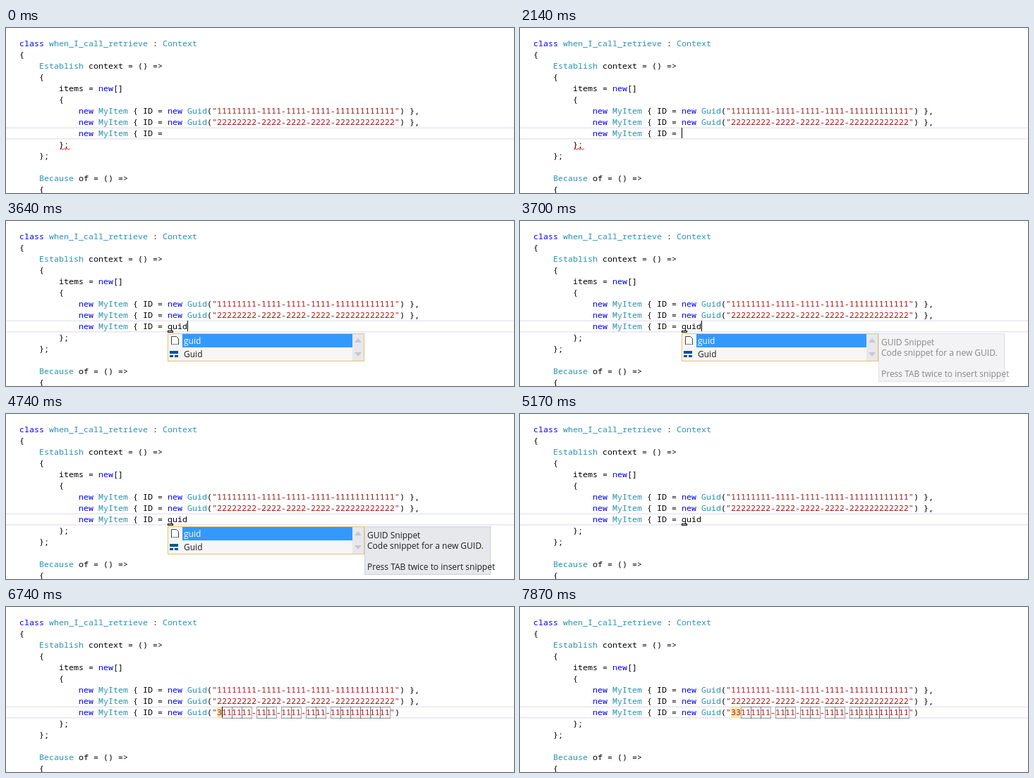
Recreate the animation shown at these times as an HTML page with a canvas. Size 720x235 px, loop 8000 ms.

```html
<!DOCTYPE html>
<html lang="en">
<head>
<meta charset="utf-8">
<title>Code editor: snippet completion</title>
<style>
  html, body { margin: 0; width: 100%; height: 100%; overflow: hidden; background: #fff; }
  canvas { display: block; }
</style>
</head>
<body>
<canvas id="stage" width="720" height="235"></canvas>
<script>
const ctx = document.getElementById('stage').getContext('2d');
const LOOP = 8000, LEFT = 19, CELL = 7, LINE = 16, FIRST_BASELINE = 26;
const CODE_FONT = '11.667px "Noto Sans Mono", monospace';
const UI_FONT = '12px "Open Sans", sans-serif';
const EDIT_ROW = 8, EDIT_X = 229, EDIT_Y = 142;
const COLORS = { keyword: '#0000ff', type: '#2b91af', string: '#a31515', plain: '#000' };

const CODE = [
  'class when_I_call_retrieve : Context',
  '{',
  '    Establish context = () =>',
  '    {',
  '        items = new[]',
  '        {',
  '            new MyItem { ID = new Guid("11111111-1111-1111-1111-111111111111") },',
  '            new MyItem { ID = new Guid("22222222-2222-2222-2222-222222222222") },',
  '            new MyItem { ID = ',
  '        };',
  '    };',
  '',
  '    Because of = () =>',
  '    {'
];
const TYPES = ['when_I_call_retrieve', 'Context', 'Establish', 'MyItem', 'Guid', 'Because'];

// Times at which the caret changes state, starting hidden.
const CARET_TOGGLES = [60, 550, 1080, 1640, 2140, 4250, 4320, 4740, 5230, 7870];

const within = (t, from, to) => t >= from && t < to;

function rect(x, y, w, h, color) {
  ctx.fillStyle = color;
  ctx.fillRect(x, y, w, h);
}

function frame(x, y, w, h, color) {
  ctx.strokeStyle = color;
  ctx.strokeRect(x + .5, y + .5, w - 1, h - 1);
}

function label(text, x, y, color = '#1e1e1e') {
  ctx.font = UI_FONT;
  ctx.fillStyle = color;
  ctx.fillText(text, x, y);
}

function colorOf(token) {
  if (token[0] === '"') return COLORS.string;
  if (token === 'class' || token === 'new') return COLORS.keyword;
  return TYPES.includes(token) ? COLORS.type : COLORS.plain;
}

function codeLine(text, row, unresolved) {
  ctx.font = CODE_FONT;
  for (const match of text.matchAll(/"[^"]*"|\w+|[^\s\w"]+/g)) {
    const token = match[0];
    const pending = unresolved && (token === 'Because' || token === 'Guid');
    ctx.fillStyle = pending ? COLORS.plain : colorOf(token);
    ctx.fillText(token, LEFT + match.index * CELL, FIRST_BASELINE + row * LINE);
  }
}

function squiggle(from, to) {
  ctx.strokeStyle = '#f00';
  ctx.beginPath();
  for (let x = from; x <= to; x += 2) ctx.lineTo(x, (x - from) % 4 ? 171.5 : 173.5);
  ctx.stroke();
}

function typedText(t) {
  if (t < 2700) return '';
  if (t < 5600) return 'guid'.slice(0, t < 2950 ? 1 : t < 3270 ? 2 : t < 3640 ? 3 : 4);
  const lead = t < 6740 ? '11' : t < 7190 ? '3' : '33';
  return `new Guid("${lead}111111-1111-1111-1111-111111111111")`;
}

// Linked two-digit fields of the inserted snippet.
function fields(text, t) {
  const start = EDIT_X + 10 * CELL;
  const typed = t < 6740 ? 2 : t < 7190 ? 1 : 2;
  rect(start, EDIT_Y, typed * CELL, 16, t < 6740 ? '#adc6cb' : '#ffe4a8');
  ctx.setLineDash([1, 1]);
  for (const pair of text.slice(10 + typed).matchAll(/11/g))
    frame(start + (typed + pair.index) * CELL, EDIT_Y, 15, 17, '#444');
  ctx.setLineDash([]);
}

function pageIcon(x, y) {
  ctx.fillStyle = '#fff';
  ctx.strokeStyle = '#424242';
  ctx.beginPath();
  ctx.moveTo(x + .5, y + 11.5);
  ctx.lineTo(x + .5, y + .5);
  ctx.lineTo(x + 7.5, y + .5);
  ctx.lineTo(x + 10.5, y + 3.5);
  ctx.lineTo(x + 10.5, y + 11.5);
  ctx.fill();
  ctx.stroke();
  ctx.setLineDash([2, 1]);
  ctx.beginPath();
  ctx.moveTo(x, y + 11.5);
  ctx.lineTo(x + 11, y + 11.5);
  ctx.stroke();
  ctx.setLineDash([]);
}

function structIcon(x, y) {
  rect(x, y, 12, 4, '#00539c');
  rect(x, y + 6, 5, 3, '#00539c');
  rect(x + 7, y + 6, 5, 3, '#00539c');
}

function arrow(x, y, dir) {
  ctx.fillStyle = '#c6c7cf';
  ctx.beginPath();
  ctx.moveTo(x - 5, y + 3 * dir);
  ctx.lineTo(x + 5, y + 3 * dir);
  ctx.lineTo(x, y - 3 * dir);
  ctx.fill();
}

function completionList(height) {
  rect(229, 160, 279, height, '#f6f6f6');
  rect(491, 161, 16, height - 2, '#e8e8ec');
  rect(250, 161, 241, 19, '#3399ff');
  frame(229, 160, 279, height, '#e5c365');
  pageIcon(234, 164);
  structIcon(232, 185);
  label('guid', 252, 175, '#fff');
  label('Guid', 252, 194);
  arrow(499, 170, 1);
  arrow(499, 160 + height - 10, -1);
}

function tooltip(alpha) {
  ctx.globalAlpha = alpha;
  rect(508, 160, 179, 69, '#e7e8ec');
  frame(508, 160, 179, 69, '#cccedb');
  label('GUID Snippet', 512, 177);
  label('Code snippet for a new GUID.', 512, 192);
  label('Press TAB twice to insert snippet', 512, 222);
  ctx.globalAlpha = 1;
}

function draw(t) {
  const text = typedText(t);
  const inserted = t >= 5600;
  rect(0, 0, 720, 235, '#fff');

  if (!within(t, 5600, 6740)) {
    rect(0, 141.5, 720, 1.5, '#e6e6f0');
    rect(0, 157, 720, 1.5, '#e6e6f0');
  }
  if (inserted) fields(text, t);

  CODE.forEach((line, row) =>
    codeLine(row === EDIT_ROW ? line + text : line, row, within(t, 5600, 5850)));

  if (t < 2780) squiggle(76.5, 90.5);
  if (within(t, 5290, 5600)) squiggle(82.5, 90.5);
  if (within(t, 2780, 5600)) frame(229, 156, 8, 3, '#000');

  const caretOn = CARET_TOGGLES.filter(time => time <= t).length % 2;
  if (caretOn) {
    const column = inserted ? (within(t, 6740, 7190) ? 11 : 12) : text.length;
    rect(EDIT_X + column * CELL, EDIT_Y, 1, 15, '#000');
  }

  if (within(t, 2780, 5170)) completionList(within(t, 2780, 3030) ? 90 : 40);
  if (within(t, 3700, 5170)) tooltip(t < 3820 ? .5 : 1);
}

function tick() {
  draw(performance.now() % LOOP);
  requestAnimationFrame(tick);
}
tick();
</script>
</body>
</html>
```
